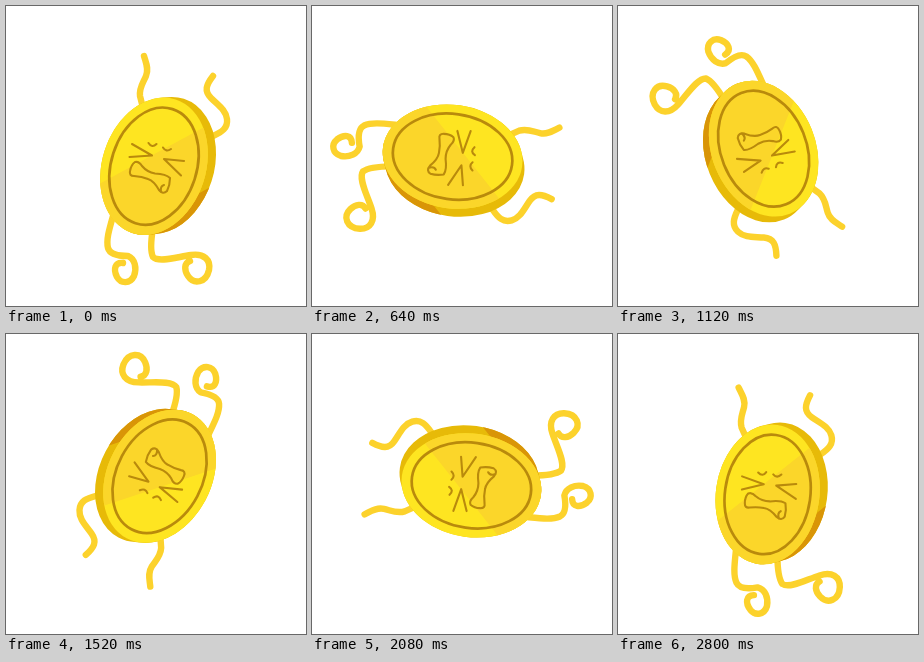
An HTML page for the animation above (2880 ms loop, 300 px wide and 300 px high).

```html
<!DOCTYPE html>
<html lang="en">
<head>
<meta charset="utf-8">
<title>Tumbling coin</title>
<style>
  html, body { margin: 0; width: 100%; height: 100%; overflow: hidden; background: #fff; }
  svg { display: block; width: 100%; height: 100%; }
  path, .ring { fill: none; stroke-linecap: round; stroke-linejoin: round; }
  .limbs { stroke: #fcd22c; stroke-width: 6.4; }
  .face { stroke: #b98a0c; stroke-width: 2.1; }
</style>
</head>
<body>
<svg viewBox="0 0 300 300">
  <defs>
    <ellipse id="disc" rx="70.2" ry="51.8" transform="translate(148 160.2) rotate(108)"/>
    <clipPath id="front"><use href="#disc"/></clipPath>
    <clipPath id="body">
      <use href="#disc"/>
      <use href="#disc" x="4.1" y="-.3"/>
      <use href="#disc" x="8.2" y="-.6"/>
    </clipPath>
  </defs>
  <g id="coin">
    <g class="limbs">
      <path d="M138 50C140 57 143 63 140 70C137 77 133 82 134 90L137 102"/>
      <path d="M207 70C200 79 198 85 205 92C212 99 220 104 221 113C222 122 216 126 207 130"/>
      <path d="M107 210C103 224 100 234 102 242C104 249 114 250 122 250C129 253 131 262 128 270C124 278 115 278 111 271C107 263 109 256 117 257"/>
      <path d="M147 222C145 234 144 245 147 251C153 257 171 251 185 249C198 247 205 254 203 264C200 277 188 279 182 270C178 264 178 257 184 255"/>
    </g>
    <g clip-path="url(#body)">
      <rect x="80" y="80" width="150" height="160" fill="#e7ba08"/>
      <polygon points="80,249 230,167 230,249" fill="#d99507"/>
    </g>
    <g clip-path="url(#front)">
      <rect x="80" y="80" width="150" height="160" fill="#fee521"/>
      <polygon points="80,185 230,104 230,240 80,240" fill="#fbd62a"/>
    </g>
    <g class="face">
      <ellipse class="ring" rx="60" ry="42.7" stroke-width="2.7" transform="translate(148 160.2) rotate(108)"/>
      <path d="M126 138L146 149.5L123.500 151M178 155L158 153L175 169.500"/>
      <path d="M142.500 137Q146 142.500 150.500 138M157 141.500Q160 146.500 165 143"/>
      <path d="M129 156Q133 155 136 160Q141 166 149 167.500Q160 168 164 172Q164 179 161 185Q157 189 153 184Q148 175 142 173Q136 170.500 128 170Q123 170 124 165Q125 159 129 156ZM155 186Q154 180 158 179"/>
    </g>
  </g>
</svg>
<script>
  const LOOP = 2880, STEP = 80;
  const coin = document.getElementById('coin');

  // One clockwise turn per loop, in hard steps.
  function draw() {
    const step = Math.floor(performance.now() % LOOP / STEP);
    coin.setAttribute('transform', `rotate(${step * 360 * STEP / LOOP} 150 151)`);
    requestAnimationFrame(draw);
  }
  draw();
</script>
</body>
</html>
```
